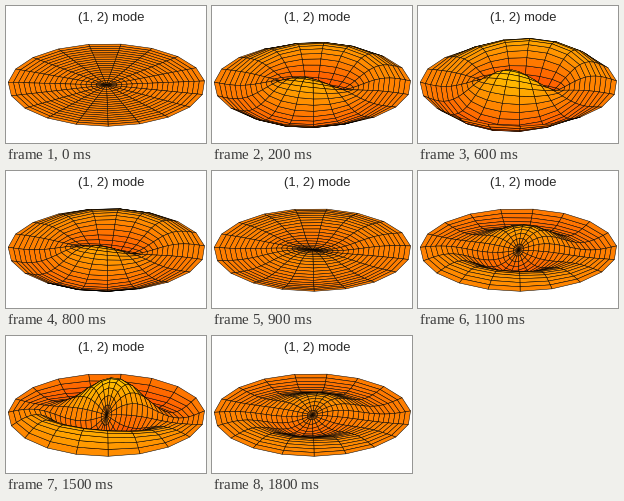
Write a matplotlib script that moves like this. It is 200 px wide and 137 px high and loops after 1.9 s.

```python
import numpy as np
import matplotlib.pyplot as plt
from matplotlib.animation import FuncAnimation
from matplotlib.collections import PolyCollection

W, H, DPI = 200, 137, 100
FRAMES, INTERVAL = 19, 100
RINGS, SECTORS = 19, 19
CX, CY = 100.5, 79         # centre of the membrane on the stage
RX, RY = 98.5, 41.3        # its half width and half height
TURN, TILT = np.radians([18, 42])  # camera azimuth and elevation
RZ = RY / np.tan(TILT)     # pixels per unit of height
ZERO = 7.01559             # second positive zero of J1


def bessel_j1(x):
    t = (np.arange(200) + 0.5) * np.pi / 200
    return np.cos(t - x[..., None] * np.sin(t)).mean(axis=-1)


def corners(a):
    """Four corners of every grid cell, as rows."""
    cells = [a[:-1, :-1], a[1:, :-1], a[1:, 1:], a[:-1, 1:]]
    return np.stack(cells, axis=-1).reshape(-1, 4)


r, theta = np.meshgrid(np.linspace(0, 1, RINGS + 1),
                       np.linspace(0, 2 * np.pi, SECTORS + 1), indexing="ij")
across = r * np.sin(theta - TURN)
toward = r * np.cos(theta - TURN)
mode = bessel_j1(ZERO * r) * np.cos(theta)

fig = plt.figure(figsize=(W / DPI, H / DPI), dpi=DPI, facecolor="white")
ax = fig.add_axes([0, 0, 1, 1])
ax.set_xlim(0, W)
ax.set_ylim(H, 0)
ax.axis("off")
ax.text(105.2, 15, "(1, 2) mode", family="Liberation Sans", size=9.4,
        color="#2a2a2a", ha="center", va="baseline")
surface = PolyCollection([], edgecolors="black", linewidths=0.36,
                         joinstyle="round")
ax.add_collection(surface)


def draw(i):
    z = np.sin(2 * np.pi * i / FRAMES) * mode
    x = corners(CX + RX * across)
    y = corners(CY + RY * toward - RZ * z)
    depth = corners(np.cos(TILT) * toward + np.sin(TILT) * z).mean(axis=1)
    order = np.argsort(depth, kind="stable")
    shade = corners(z)[order, 0]  # each cell takes its first corner's height
    surface.set_verts(np.stack([x, y], axis=-1)[order])
    surface.set_facecolor(plt.cm.autumn((shade + 1) / 2))
    return [surface]


anim = FuncAnimation(fig, draw, frames=FRAMES, interval=INTERVAL,
                     repeat=True, repeat_delay=0)
plt.show()
```
